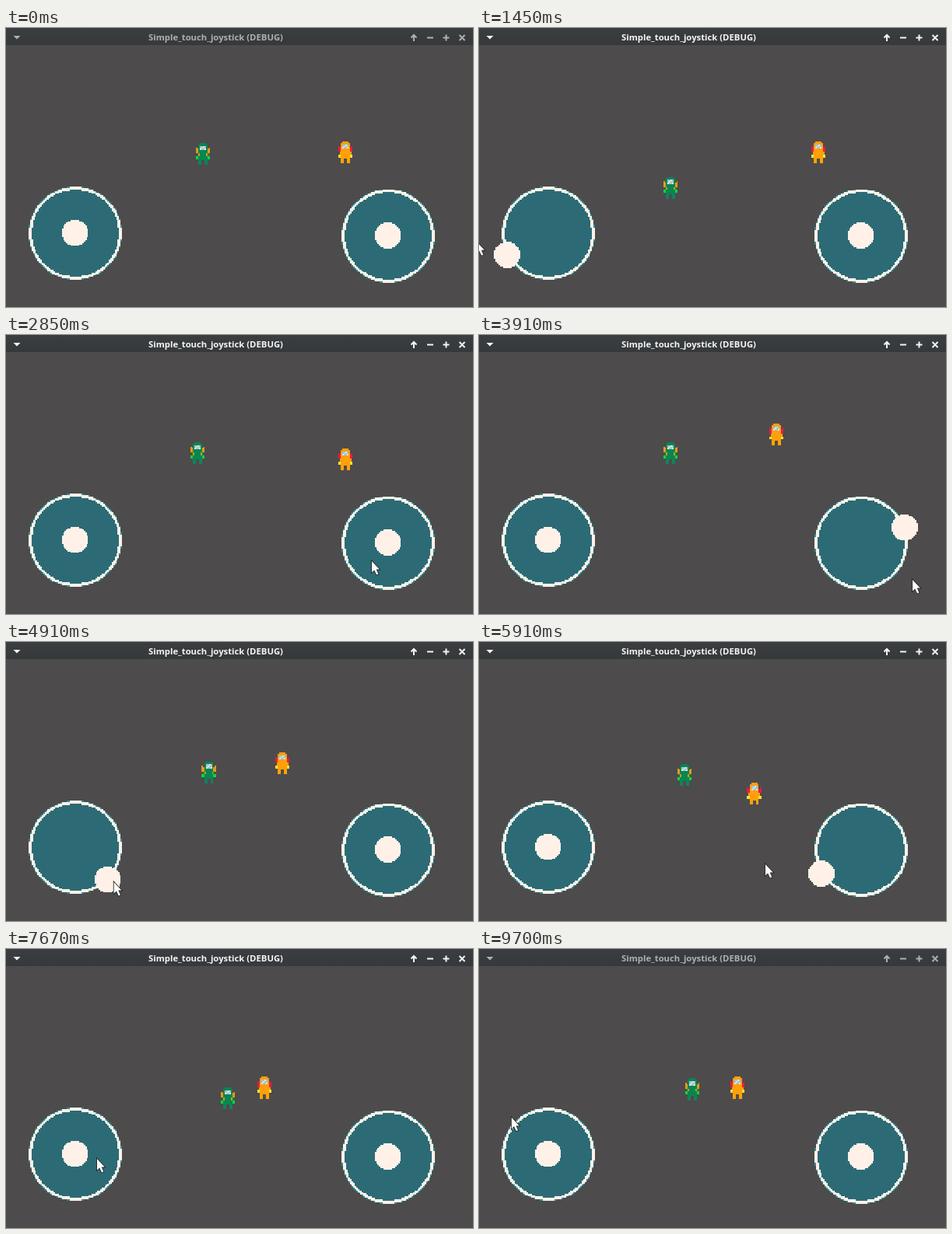
Animation, 600 px wide and 359 px high, one loop 9.76 s. Source, as an HTML page with a canvas:

```html
<!DOCTYPE html>
<html lang="en">
<head>
<meta charset="utf-8">
<title>Touch joystick</title>
<style>
  html, body { margin: 0; width: 100%; height: 100%; overflow: hidden; background: #4d4b4c; }
  canvas { position: absolute; left: 0; top: 0; }
  .bar {
    position: absolute; left: 0; top: 0; width: 600px; height: 22px;
    background: linear-gradient(#3b3e40, #36393b);
    animation: focus 9760ms step-end infinite;
  }
  .bar span {
    position: absolute; left: 0; width: 539px; top: 3px; text-align: center; white-space: nowrap;
    font: bold 11.3px/18px "Noto Sans", "Open Sans", sans-serif;
  }
  .bar svg { position: absolute; left: 0; top: 0; }
  @keyframes focus {
    0%, 100% { color: #adb0b1; }
    8.7% { color: #f4f4f4; }
    91.7% { color: #adb0b1; }
  }
</style>
</head>
<body>
<canvas id="stage" width="600" height="359"></canvas>
<div class="bar">
  <span>Simple_touch_joystick (DEBUG)</span>
  <svg width="600" height="22" fill="none" stroke="currentColor" stroke-width="2">
    <path d="M9.500 10h9l-4.500 4.500z" fill="currentColor" stroke="none"/>
    <path d="M524 17V9.500M520.500 12.500l3.500-3.500l3.500 3.500M541 12.500h8M561.500 12.500h8M565.500 8.500v8M582.500 9l7 7M589.500 9l-7 7"/>
  </svg>
</div>
<script>
const LOOP = 9760, LAG = 90, CELL = 1.875, REACH = 59.5, SPEED = 0.117;
const ctx = document.getElementById('stage').getContext('2d');

const visor = { w: '#e0e8ec', l: '#a6c3d0' };
const left = {
  x: 88.5, y: 263.5, home: [253, 162],
  paint: { a: '#078650', b: '#14805d', s: '#e79b12', t: '#c79a1c', h: '#10d63c', ...visor }
};
const right = {
  x: 490.5, y: 267, home: [436, 160],
  paint: { a: '#ff9f0c', b: '#ffa300', s: '#f0183f', t: '#ff9f0c', h: '#ffe12b', ...visor }
};

// A drag sweeps the stick from one angle to another and walks its player to a spot.
const drags = [
  { pad: left, start: 1000, end: 2460, angle: 46, sweep: 342, pull: 92, to: [246, 152] },
  { pad: right, start: 3130, end: 3680, angle: 180, sweep: 20, pull: 82, to: [397, 143.5] },
  { pad: right, start: 3680, end: 4290, angle: 200, sweep: 372, pull: 82, to: [355, 156] },
  { pad: left, start: 4680, end: 4960, angle: 45, sweep: 0, pull: 65, to: [264, 171] },
  { pad: right, start: 5600, end: 6460, angle: 70, sweep: 217, pull: 124, to: [332, 178.5] },
  { pad: left, start: 6780, end: 7050, angle: 45, sweep: 0, pull: 65, to: [285, 192] },
  { pad: left, start: 7860, end: 8060, angle: 225, sweep: 0, pull: 66, to: [274, 180.5] }
];
drags.forEach((d, i) => { d.chained = i > 0 && drags[i - 1].end === d.start; });

const rad = deg => deg * Math.PI / 180;
const mix = (a, b, u) => a.map((v, i) => v + (b[i] - v) * u);
const polar = (r, a) => [r * Math.cos(a), r * Math.sin(a)];

// Offset of the pointer from the pad centre during a drag.
function offset(d, t, limit) {
  const u = (t - d.start) / (d.end - d.start);
  const grow = d.chained ? 1 : Math.min(1, (t - d.start) / LAG);
  return polar(Math.min(limit, d.pull * grow), rad(d.angle + d.sweep * u));
}

// Constant speed under a turning heading walks along an arc.
function arc(d, u) {
  const half = rad(d.sweep * u) / 2;
  const chord = SPEED * (d.end - d.start) * u * (half ? Math.sin(half) / half : 1);
  return polar(chord, rad(d.angle) + half);
}

function walk(pad, t) {
  let from = pad.home;
  for (const d of drags) {
    if (d.pad !== pad || t < d.start) continue;
    if (t < d.end) {
      const u = (t - d.start) / (d.end - d.start), step = arc(d, u), whole = arc(d, 1);
      return from.map((v, i) => v + step[i] + (d.to[i] - v - whole[i]) * u);
    }
    from = d.to;
  }
  return from;
}

// The pointer runs ahead of the sticks and glides between stops.
const stop = (time, x, y) => ({ start: time, end: time, at: () => [x, y] });
const stops = [
  stop(330, -14, 300), stop(2850, 470, 291), stop(7670, 117, 270), stop(8700, -20, 309),
  ...drags.map(d => ({
    start: d.start - LAG, end: d.end - LAG,
    at: t => {
      const [dx, dy] = offset(d, t + LAG, Infinity);
      return [d.pad.x + dx, d.pad.y + dy];
    }
  }))
].sort((a, b) => a.start - b.start);

function pointer(t) {
  const next = stops.findIndex(s => s.start > t);
  if (next === 0) return stops[0].at();
  const last = stops.at(next - 1);
  if (t <= last.end || next < 0) return last.at(t);
  const goal = stops[next];
  const u = (t - last.end) / (goal.start - last.end);
  return mix(last.at(last.end), goal.at(goal.start), u * u * (3 - 2 * u));
}

// Fills a cell grid centred on x, y; color(col, row) may return nothing.
function cells(x, y, cols, rows, color) {
  const x0 = x - cols * CELL / 2, y0 = y - rows * CELL / 2;
  const edge = (from, n) => Math.round(from + n * CELL);
  for (let r = 0; r < rows; r++) for (let c = 0; c < cols; c++) {
    const fill = color(c, r);
    if (!fill) continue;
    const px = edge(x0, c), py = edge(y0, r);
    ctx.fillStyle = fill;
    ctx.fillRect(px, py, edge(x0, c + 1) - px, edge(y0, r + 1) - py);
  }
}

function disc(x, y, size, bands) {
  const mid = (size - 1) / 2;
  cells(x, y, size, size, (c, r) => {
    const d = Math.hypot(c - mid, r - mid);
    const band = bands.find(b => d < b[0]);
    return band && band[1];
  });
}

const shape = [
  '...aaaa...',
  '..aaaaaa..',
  '..allwla..',
  's.alwlla.s',
  'ssawllwass',
  'ssaaaaaass',
  'ssaaaaaass',
  '.ataaaata.',
  '.ataaaata.',
  'hhaaaaaahh',
  'hhaaaaaahh',
  '..aaaaaa..',
  '..bb..bb..',
  '..bb..bb..',
  '..bb..bb..'
];
const person = ([x, y], paint) => cells(x, y, 10, 15, (c, r) => paint[shape[r][c]]);

// Static background: window body and both pads.
ctx.fillStyle = '#4d4b4c';
ctx.fillRect(0, 0, 600, 359);
for (const pad of [left, right])
  disc(pad.x + 0.5, pad.y + 0.5, 64, [[29.8, '#2c6b75'], [31.75, '#fff1e8'], [32.1, '#2b8f98']]);
const scene = document.createElement('canvas');
scene.width = 600;
scene.height = 359;
scene.getContext('2d').drawImage(ctx.canvas, 0, 0);

function knob(pad, t) {
  const held = drags.find(d => d.pad === pad && t >= d.start && t < d.end);
  const [dx, dy] = held ? offset(held, t, REACH) : [0, 0];
  disc(pad.x + dx, pad.y + dy, 18, [[9, '#fff1e8']]);
}

const arrow = new Path2D('M0 0V14.500L3.200 11.500L6 17.500L8.300 16.500L5.700 10.600H9.800Z');

function draw(now) {
  const t = now % LOOP;
  ctx.drawImage(scene, 0, 0);
  for (const pad of [left, right]) person(walk(pad, t), pad.paint);
  for (const pad of [left, right]) knob(pad, t);
  ctx.save();
  ctx.translate(...pointer(t));
  ctx.lineWidth = 1.7;
  ctx.strokeStyle = '#242424';
  ctx.stroke(arrow);
  ctx.fillStyle = '#fff';
  ctx.fill(arrow);
  ctx.restore();
  requestAnimationFrame(draw);
}
draw(performance.now());
</script>
</body>
</html>
```
